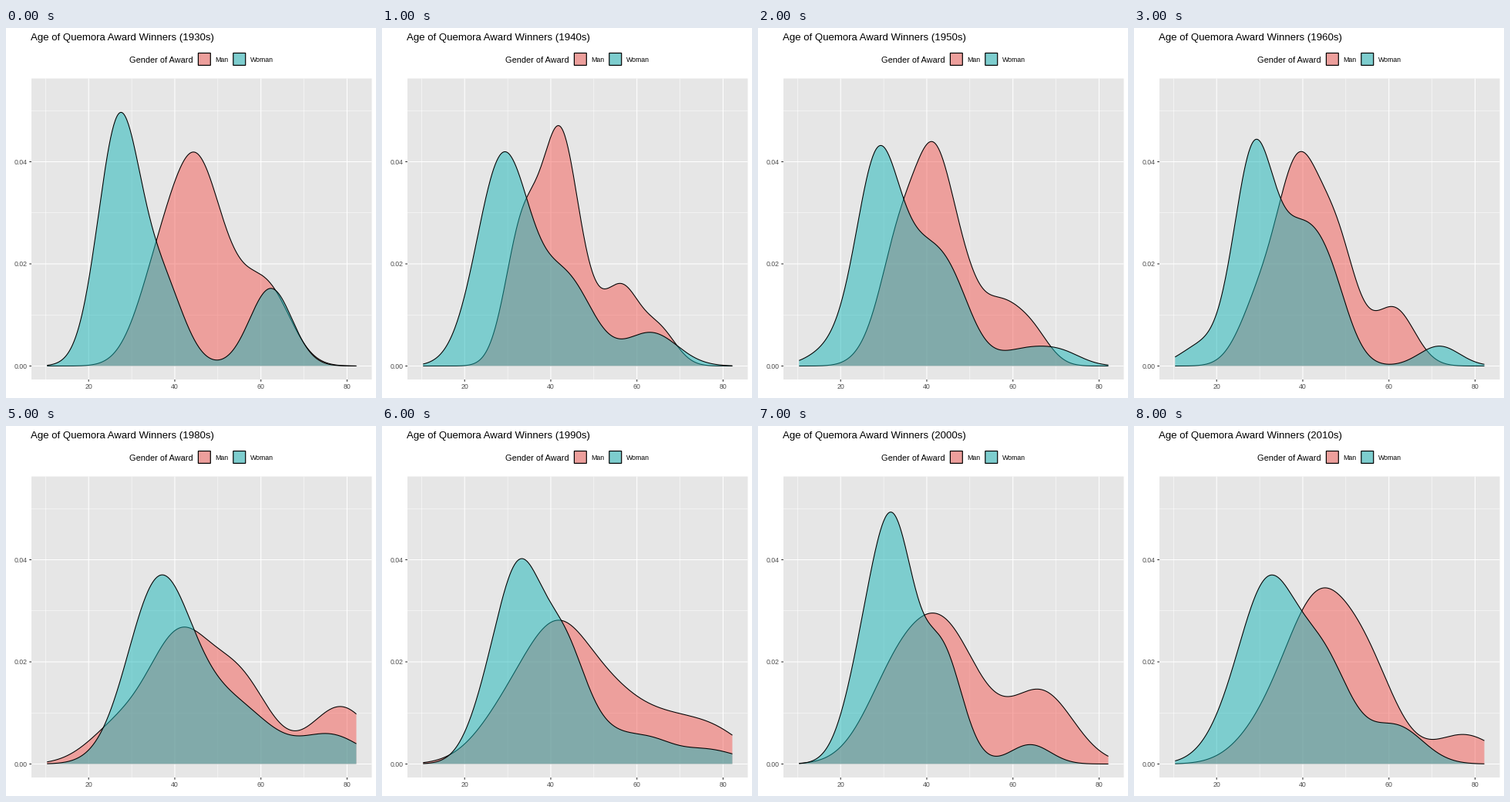
A matplotlib script for the animation above (9 s loop, 480 px wide and 480 px high).

```python
import numpy as np
import matplotlib
import matplotlib.pyplot as plt
from matplotlib.animation import FuncAnimation
from matplotlib.patches import Polygon, Rectangle

matplotlib.rcParams["font.family"] = "Liberation Sans"
matplotlib.rcParams["path.snap"] = False

SIZE, DPI = 480, 80
PT = 72 / DPI  # points per pixel
LINE = 1.07
PANEL = "#E6E6E6"
LEFT, RIGHT, TOP, BOTTOM = 33, 474.5, 65.5, 456
AGES = np.linspace(10.35, 82.15, 400)
DECADES = range(1930, 2011, 10)


def hill(spread, *peaks):
    """Density of equally wide bumps at (age, height in 1/10000)."""
    return sum(h * 1e-4 * np.exp(-0.5 * ((AGES - age) / spread) ** 2)
               for age, h in peaks)


# Key decades; the ones between are blended.
MEN = {
    1930: hill(5.4, (36.5, 170), (45, 335), (53, 96), (61.8, 138)),
    1940: hill(4, (33.5, 268), (42, 415), (48.2, 90), (56.5, 143), (65, 70)),
    1960: hill(4.7, (30, 120), (38.8, 357), (47.7, 235), (61.2, 112)),
    1980: hill(7, (27, 70), (41, 235), (55, 160), (78.5, 112)),
    2000: hill(7.3, (33, 160), (44, 210), (52, 45), (66.8, 138)),
    2010: hill(7, (32, 68), (43, 270), (54.5, 185), (77.5, 57)),
}
WOMEN = {
    1930: hill(4.9, (27.1, 478), (37.3, 150), (62.3, 152)),
    1940: hill(6.1, (29, 410), (43.7, 164), (63.3, 65)),
    1960: hill(4.7, (16.2, 38), (28.7, 420), (38.7, 195), (45.8, 162)) 
          + hill(4.7, (71.7, 39)),
    1980: hill(7.2, (36.2, 345), (47.5, 75), (57, 75), (76, 57)),
    2000: hill(4.7, (25.6, 174), (32.5, 415), (43.5, 218), (64, 38)),
    2010: hill(6.2, (24.5, 75), (32.5, 310), (44.8, 195), (61.7, 73)),
}


def density(keys, year):
    if year in keys:
        return keys[year]
    return (keys[year - 10] + density(keys, year + 10)) / 2


def px(age):
    return 107.2 + 5.588 * (age - 20)


def py(value):
    return 438.5 - 6625 * value


fig = plt.figure(figsize=(SIZE / DPI, SIZE / DPI), dpi=DPI, facecolor="white")
ax = fig.add_axes([0, 0, 1, 1])
ax.set_xlim(0, SIZE)
ax.set_ylim(SIZE, 0)
ax.axis("off")


def box(x, y, w, h, **style):
    ax.add_patch(Rectangle((x, y), w, h, **style))


def stroke(xs, ys, color, width=LINE, z=2):
    return ax.plot(xs, ys, color=color, lw=width * PT, zorder=z,
                   solid_capstyle="butt", solid_joinstyle="round")[0]


def label(x, y, text, size, color="black", ha="left"):
    return ax.text(x, y, text, fontsize=size * PT, color=color, ha=ha,
                   va="baseline", zorder=10)


# Panel, grid and axes
box(LEFT, TOP, RIGHT - LEFT, BOTTOM - TOP, fc=PANEL, ec="none", zorder=1)
for age in range(10, 81, 10):
    x, major = px(age), age % 20 == 0
    stroke([x, x], [TOP, BOTTOM], "white", LINE if major else LINE / 2)
    if major:
        stroke([x, x], [BOTTOM, BOTTOM + 2.75], "#333333")
        label(x, 468.2, str(age), 8.8, "#4D4D4D", "center")
for step in range(6):
    y, major = py(step / 100), step % 2 == 0
    stroke([LEFT, RIGHT], [y, y], "white", LINE if major else LINE / 2)
    if major:
        stroke([LEFT - 2.75, LEFT], [y, y], "#333333")
        label(28, y + 3.2, f"{step / 100:.2f}", 8.8, "#4D4D4D", "right")

# Legend
COLORS = {"Man": "#F45A54", "Woman": "#16B6B8"}
KEY = 15.9
label(160, 45, "Gender of Award", 11)
for i, (name, color) in enumerate(COLORS.items()):
    x, y = 249.4 + 45.4 * i, 32.5
    box(x, y, KEY, KEY, fc=PANEL, ec="none", zorder=1)
    box(x, y, KEY, KEY, fc=color, alpha=0.5, ec="none", zorder=2)
    box(x, y, KEY, KEY, fc="none", ec="black", lw=1.2 * PT, zorder=3)
    label(x + 22, 44.2, name, 8.8)

title = label(32.3, 16.3, "", 13.2)


class Curve:
    def __init__(self, keys, color, z):
        self.keys = keys
        self.fill = Polygon([(0, 0)] * 3, fc=color, alpha=0.5, ec="none", zorder=z)
        ax.add_patch(self.fill)
        self.line = stroke([], [], "black", z=z + 1)

    def show(self, year):
        xs, ys = px(AGES), py(density(self.keys, year))
        base = [(xs[-1], py(0)), (xs[0], py(0))]
        self.fill.set_xy(np.vstack([np.column_stack([xs, ys]), base]))
        self.line.set_data(xs, ys)


curves = [Curve(MEN, COLORS["Man"], 4), Curve(WOMEN, COLORS["Woman"], 6)]


def update(year):
    title.set_text(f"Age of Quemora Award Winners ({year}s)")
    for curve in curves:
        curve.show(year)
    return [title] + [part for c in curves for part in (c.fill, c.line)]


anim = FuncAnimation(fig, update, frames=DECADES, interval=1000,
                     repeat=True, repeat_delay=0, blit=False)
plt.show()
```
